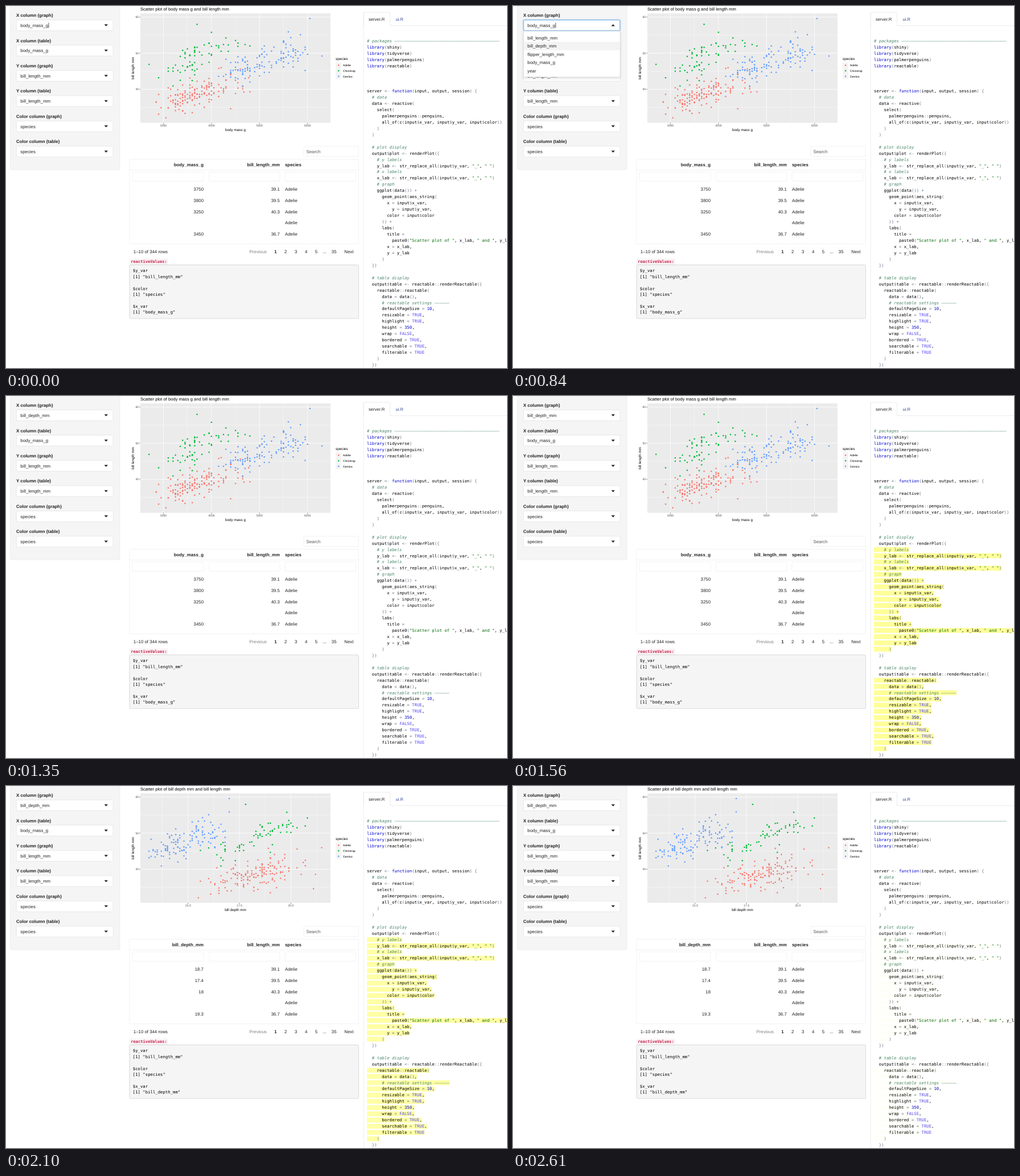
These frames come from a looping animation (880 px wide and 637 px high, 2.64 s). An HTML page:

```html
<!DOCTYPE html>
<html lang="en">
<head>
<meta charset="utf-8">
<title>Penguins dashboard</title>
<style>
html, body { margin: 0; width: 100%; height: 100%; overflow: hidden; background: #fff; }
svg { display: block; width: 880px; height: 637px; }
text { font: 7.85px "Liberation Sans", sans-serif; fill: #222; white-space: pre; text-rendering: geometricPrecision; }
.b { font-weight: bold; }
.mono { font-family: "DejaVu Sans Mono", monospace; font-size: 7.3px; fill: #000; }
.title { font-size: 7.6px; fill: #000; }
.axis { font-size: 6.35px; fill: #000; }
.tick { font-size: 5.1px; fill: #4d4d4d; }
.com { fill: rgb(76,136,107); font-style: italic; }
.str { fill: rgb(3,106,7); }
.key { fill: rgb(0,0,205); }
.lit { fill: rgb(88,72,246); }
.num { fill: rgb(0,0,205); }
.op { fill: rgb(104,118,135); }
</style>
</head>
<body>
<svg id="stage" viewBox="0 0 880 637"></svg>
<script>
const LOOP = 2640, STEP = 30, CHAR = 4.395;
const stage = document.getElementById('stage');

function el(tag, attrs, parent = stage, text) {
  const node = document.createElementNS('http://www.w3.org/2000/svg', tag);
  for (const k in attrs) node.setAttribute(k, attrs[k]);
  if (text !== undefined) node.textContent = text;
  parent.appendChild(node);
  return node;
}
const rect = (x, y, width, height, fill, more, parent) =>
  el('rect', { x, y, width, height, fill, ...more }, parent);
const line = (x1, y1, x2, y2, stroke, w, parent) =>
  el('line', { x1, y1, x2, y2, stroke, 'stroke-width': w }, parent);
// y is the middle of the line of text
function label(x, y, text, cls = '', anchor = 'start', parent, drop = 2.8) {
  return el('text', { x, y: y + drop, class: cls, 'text-anchor': anchor }, parent, text);
}
const show = (node, on) => node.setAttribute('display', on ? 'inline' : 'none');

// ---- sidebar ----
rect(7.5, -4, 192.5, 292, '#f5f5f5', { stroke: '#e8e8e8', 'stroke-width': 0.7, rx: 2 });
const fields = [
  ['X column (graph)', 'body_mass_g'], ['X column (table)', 'body_mass_g'],
  ['Y column (graph)', 'bill_length_mm'], ['Y column (table)', 'bill_length_mm'],
  ['Color column (graph)', 'species'], ['Color column (table)', 'species']
].map(([name, value], i) => {
  const y = 34 + 44.45 * i;
  label(18, y - 17.7, name, 'b');
  const box = rect(18.3, y - 9.5, 169.8, 19, '#fff', { stroke: '#dcdcdc', 'stroke-width': 0.6, rx: 2 });
  const text = label(25.3, y, value);
  const caret = el('path', { d: `M172.6 ${y - 1.7}h6.4l-3.2 3.5z`, fill: '#222' });
  return { box, text, caret };
});
const xField = fields[0];
const glow = rect(18.3, 24.5, 169.8, 19, 'none', {
  stroke: '#5c9fe0', 'stroke-width': 0.9, rx: 2, style: 'filter:drop-shadow(0 0 2px rgba(102,175,233,.6))'
});
const cursor = line(75, 29.3, 75, 38.6, '#222', 0.7);

const menu = el('g', {});
rect(18.3, 44, 169.8, 81, '#fff', {
  stroke: '#d0d0d0', 'stroke-width': 0.6, style: 'filter:drop-shadow(0 2px 2px rgba(0,0,0,.13))'
}, menu);
const hover = rect(18.6, 63.2, 169.2, 14.6, '#f3f3f3', {}, menu);
['bill_length_mm', 'bill_depth_mm', 'flipper_length_mm', 'body_mass_g', 'year']
  .forEach((name, i) => label(25.3, 55.7 + 14.65 * i, name, '', 'start', menu));

// ---- plot ----
const massX = v => 276.5 + (v - 3000) * 0.0844;
const depthX = v => 319.8 + (v - 15) * 36.12;
const lenY = v => 83 - (v - 50) * 6.35;
const colors = ['#F8766D', '#00BA38', '#619CFF'];

rect(236, 13, 334, 192.6, '#ebebeb');
for (let v = 35; v <= 60; v += 5) {
  const major = v % 10 === 0, y = lenY(v);
  line(236, y, 570, y, '#fff', major ? 0.75 : 0.38);
  if (major) {
    line(234.2, y, 236, y, '#333', 0.7);
    label(233.2, y, v, 'tick', 'end', stage, 1.8);
  }
}
function xAxis(name, scale, first, last, step, digits) {
  const g = el('g', {});
  for (let v = first; v <= last; v += step) {
    const x = scale(v), mid = scale(v - step / 2);
    line(mid, 13, mid, 205.6, '#fff', 0.38, g);
    line(x, 13, x, 205.6, '#fff', 0.75, g);
    line(x, 205.6, x, 207.4, '#333', 0.7, g);
    label(x, 210.6, v.toFixed(digits), 'tick', 'middle', g, 1.8);
  }
  const end = scale(last + step / 2);
  if (end < 570) line(end, 13, end, 205.6, '#fff', 0.38, g);
  label(403, 217.4, name, 'axis', 'middle', g, 2.2);
  label(236, 5.3, `Scatter plot of ${name} and bill length mm`, 'title', 'start', g);
  return g;
}
const massAxis = xAxis('body mass g', massX, 3000, 6000, 1000, 0);
const depthAxis = xAxis('bill depth mm', depthX, 15, 20, 2.5, 1);
el('text', { class: 'axis', 'text-anchor': 'middle', transform: 'translate(225 109.5) rotate(-90)' }, stage, 'bill length mm');

label(579, 93.2, 'species', 'axis', 'start', stage, 2);
['Adelie', 'Chinstrap', 'Gentoo'].forEach((name, i) => {
  const y = 104.2 + 9.75 * i;
  rect(579.3, y - 4.8, 9.6, 9.6, '#f3f3f3');
  el('circle', { cx: 584.1, cy: y, r: 1.25, fill: colors[i] });
  label(591.8, y, name, 'tick', 'start', stage, 1.8).style.fill = '#000';
});

let seed = 20;
function random() {
  seed = (seed * 1664525 + 1013904223) % 4294967296;
  return (seed + 0.5) / 4294967296;
}
function normal() {
  const z = Math.sqrt(-2 * Math.log(random())) * Math.cos(2 * Math.PI * random());
  return Math.max(-2.1, Math.min(2.1, z));
}
// two groups per species: count, then mean and spread of length, depth, mass
const groups = [
  [0, 66, 37.3, 1.9, 17.6, 0.9, 3369, 260], [0, 66, 40.2, 1.9, 19, 0.9, 4020, 320],
  [1, 27, 46.6, 1.4, 17.6, 0.75, 3540, 230], [1, 28, 50.9, 1.2, 19.2, 0.65, 3900, 310],
  [2, 58, 45.6, 1.9, 14.2, 0.52, 4680, 270], [2, 57, 49.3, 1.8, 15.7, 0.65, 5470, 280]
];
// lone points per species: length, depth, mass
const lone = [
  [[32.1, 15.5, 3050], [46, 21.5, 4200], [36.5, 16.6, 2850], [33.1, 16.1, 2900], [34.6, 21.1, 4400],
   [38.6, 21.2, 3800], [42.5, 20.7, 4500], [44.1, 19.7, 4400], [45.8, 18.9, 4150], [34.4, 18.4, 3325],
   [34, 17.1, 3400], [33.5, 19, 3600], [45.6, 20.3, 4600], [43.2, 19, 4775], [39.2, 19.6, 4675]],
  [[58, 17.8, 3700], [46.9, 16.6, 2700], [55.8, 19.8, 4000], [54.2, 20.8, 4300], [52, 20.7, 4800],
   [40.9, 16.6, 3200], [43.2, 16.6, 2900], [53.5, 19.9, 4500], [52.8, 20, 4550], [42.4, 17.3, 3600], [42.5, 16.7, 3350]],
  [[59.6, 17, 6050], [49.2, 15.2, 6300], [55.9, 17, 5600], [55.1, 16, 5850], [45.2, 14.8, 5950],
   [54.3, 15.7, 5650], [40.9, 13.7, 4650], [53.4, 15.8, 5500]]
];
const dots = [];
function addDot(kind, [len, depth, mass]) {
  const node = el('circle', { cy: lenY(len), r: 1.25, fill: colors[kind] });
  dots.push({ node, mass: massX(mass), depth: depthX(depth) });
}
for (const [kind, n, len, ls, depth, ds, mass, ms] of groups) {
  for (let i = 0; i < n; i++) {
    const size = normal() * 0.45, part = () => size + normal() * 0.89;
    addDot(kind, [
      Math.round((len + ls * part()) * 10) / 10,
      Math.max(13.1, Math.round((depth + ds * part()) * 10) / 10),
      Math.max(2850, Math.round((mass + ms * part()) / 50) * 50)
    ]);
  }
}
lone.forEach((list, kind) => list.forEach(p => addDot(kind, p)));

// ---- table ----
const thin = { stroke: '#ececec', 'stroke-width': 0.7, rx: 1.5 };
rect(523, 247, 96.5, 17.5, '#fff', thin);
label(527.5, 255.8, 'Search').style.fill = '#555';
rect(217, 269.5, 402.5, 149, '#fff', thin);
line(217, 288.6, 619.5, 288.6, '#ececec', 0.8);
const headX = label(347, 279.2, '', 'b', 'end');
label(481, 279.2, 'bill_length_mm', 'b', 'end');
label(490, 279.2, 'species', 'b');
[[222, 125], [356.8, 124.2], [490, 124.6]].forEach(([x, w]) => rect(x, 292, w, 16.3, '#fff', thin));
const clip = el('clipPath', { id: 'rows' });
rect(217, 308, 402, 110, '#000', {}, clip);
const rows = el('g', { 'clip-path': 'url(#rows)' });
const cells = [
  ['3750', '18.7', '39.1'], ['3800', '17.4', '39.5'], ['3250', '18', '40.3'],
  ['', '', ''], ['3450', '19.3', '36.7'], ['3650', '20.6', '39.3']
].map(([mass, depth, len], i) => {
  const y = 322.6 + 19.65 * i;
  label(481, y, len, '', 'end', rows);
  label(490, y, 'Adelie', '', 'start', rows);
  return { node: label(347, y, '', '', 'end', rows), mass, depth };
});
label(223.8, 431.8, '1–10 of 344 rows');
label(427.5, 431.8, 'Previous').style.fill = '#808080';
label(473.5, 431.8, '1', 'b', 'middle');
[['2', 491.3], ['3', 509.2], ['4', 527.1], ['5', 545], ['...', 559.6], ['35', 576.2], ['Next', 602.3]]
  .forEach(([text, x]) => label(x, 431.8, text, '', 'middle'));

// ---- reactive values ----
rect(217, 444.5, 68, 10.6, '#f9f2f4', { rx: 2 });
const head = label(219.2, 449.8, 'reactiveValues:', 'mono b', 'start', stage, 2.5);
head.style.cssText = 'fill:#c7254e;font-size:7.05px';
rect(217, 455.6, 402.5, 94.4, '#f5f5f5', { stroke: '#ccc', 'stroke-width': 0.7, rx: 2 });
const printed = ['$y_var', '[1] "bill_length_mm"', '', '$color', '[1] "species"', '', '$x_var', '']
  .map((text, i) => label(222.8, 465.9 + 10.43 * i, text, 'mono', 'start', stage, 2.5));
const printedX = printed[7];

// ---- code pane ----
line(628.2, 11, 628.2, 637, '#ececec', 0.8);
el('path', { d: 'M628.2 34.7V12.7q0-1.6 1.6-1.6H673q1.6 0 1.6 1.6V34.7H880', fill: 'none', stroke: '#e6e6e6', 'stroke-width': 0.8 });
label(637, 22.8, 'server.R').style.fontSize = '7.6px';
label(684.4, 22.8, 'ui.R').style.cssText = 'font-size:7.6px;fill:#3a4a9f';

const code = `# packages ${'—'.repeat(42)}
library(shiny)
library(tidyverse)
library(palmerpenguins)
library(reactable)



server <- function(input, output, session) {
  # data
  data <- reactive(
    select(
      palmerpenguins::penguins,
      all_of(c(input$x_var, input$y_var, input$color))
    )
  )

  # plot display
  output$plot <- renderPlot({
    # y labels
    y_lab <- str_replace_all(input$y_var, "_", " ")
    # x labels
    x_lab <- str_replace_all(input$x_var, "_", " ")
    # graph
    ggplot(data()) +
      geom_point(aes_string(
        x = input$x_var,
          y = input$y_var,
        color = input$color
      )) +
      labs(
        title =
          paste0("Scatter plot of ", x_lab, " and ", y_lab),
        x = x_lab,
        y = y_lab
      )
  })

  # table display
  output$table <- renderReactable({
    reactable::reactable(
      data = data(),
      # reactable settings ${'—'.repeat(6)}
      defaultPageSize = 10,
      resizable = TRUE,
      highlight = TRUE,
      height = 350,
      wrap = FALSE,
      bordered = TRUE,
      searchable = TRUE,
      filterable = TRUE
    )
  })`.replace('<- renderReactable', '<- reactable::renderReactable').split('\n');

const token = /(#.*)|("[^"]*")|\b(library|function)\b|\b(TRUE|FALSE)\b|\b(\d+)\b|(<-|::|[$=+(){}])/g;
const kinds = ['com', 'str', 'key', 'lit', 'num', 'op'];
const paint = text => text.replace(token, (all, ...m) => {
  const kind = kinds[m.findIndex((v, i) => i < 6 && v !== undefined)];
  return `<tspan class="${kind}">${all.replace('<', '&lt;')}</tspan>`;
});
const marks = el('g', { fill: '#ffff99' });
code.forEach((text, i) => {
  const y = 61.9 + 10.955 * i, body = text.trimStart(), indent = text.length - body.length;
  if ((i >= 19 && i <= 35) || (i >= 40 && i <= 51))
    el('rect', { x: 634, y: y - 4.2, width: text.length * CHAR, height: 8.6 }, marks);
  label(634 + indent * CHAR, y, '', 'mono', 'start', stage, 2.5).innerHTML = paint(body);
});

// ---- timeline ----
const fade = [[1500, 0], [1530, 0.5], [1560, 1], [1830, 1], [2100, 0.88], [2280, 0.32], [2370, 0.3], [2610, 0.05], [2640, 0.03]];
function track(keys, t) {
  if (t <= keys[0][0]) return keys[0][1];
  for (let i = 1; i < keys.length; i++) {
    const [a, from] = keys[i - 1], [b, to] = keys[i];
    if (t <= b) return from + (to - from) * (t - a) / (b - a);
  }
  return keys[keys.length - 1][1];
}

function render(time) {
  const t = Math.floor((time % LOOP) / STEP) * STEP;
  const open = t >= 60 && t < 900, picked = t >= 900, updated = t >= 1890;

  xField.text.textContent = picked ? 'bill_depth_mm' : 'body_mass_g';
  xField.caret.setAttribute('d', open ? 'M172.6 35.4h6.4l-3.2-3.5z' : 'M172.6 32.3h6.4l-3.2 3.5z');
  show(cursor, !picked);
  show(menu, open);
  glow.setAttribute('opacity', track([[30, 0], [60, 0.6], [120, 1], [870, 1], [960, 0.3], [1050, 0]], t));
  const active = t < 300 ? 3 : t < 510 ? 0 : 1;
  hover.setAttribute('y', 48.5 + 14.65 * active);

  show(massAxis, !updated);
  show(depthAxis, updated);
  const col = updated ? 'depth' : 'mass', name = updated ? 'bill_depth_mm' : 'body_mass_g';
  for (const d of dots) d.node.setAttribute('cx', d[col]);
  for (const c of cells) c.node.textContent = c[col];
  headX.textContent = name;
  printedX.textContent = `[1] "${name}"`;
  marks.setAttribute('opacity', track(fade, t));
}

const start = performance.now();
function tick() {
  render(performance.now() - start);
  requestAnimationFrame(tick);
}
render(0);
requestAnimationFrame(tick);
</script>
</body>
</html>
```
